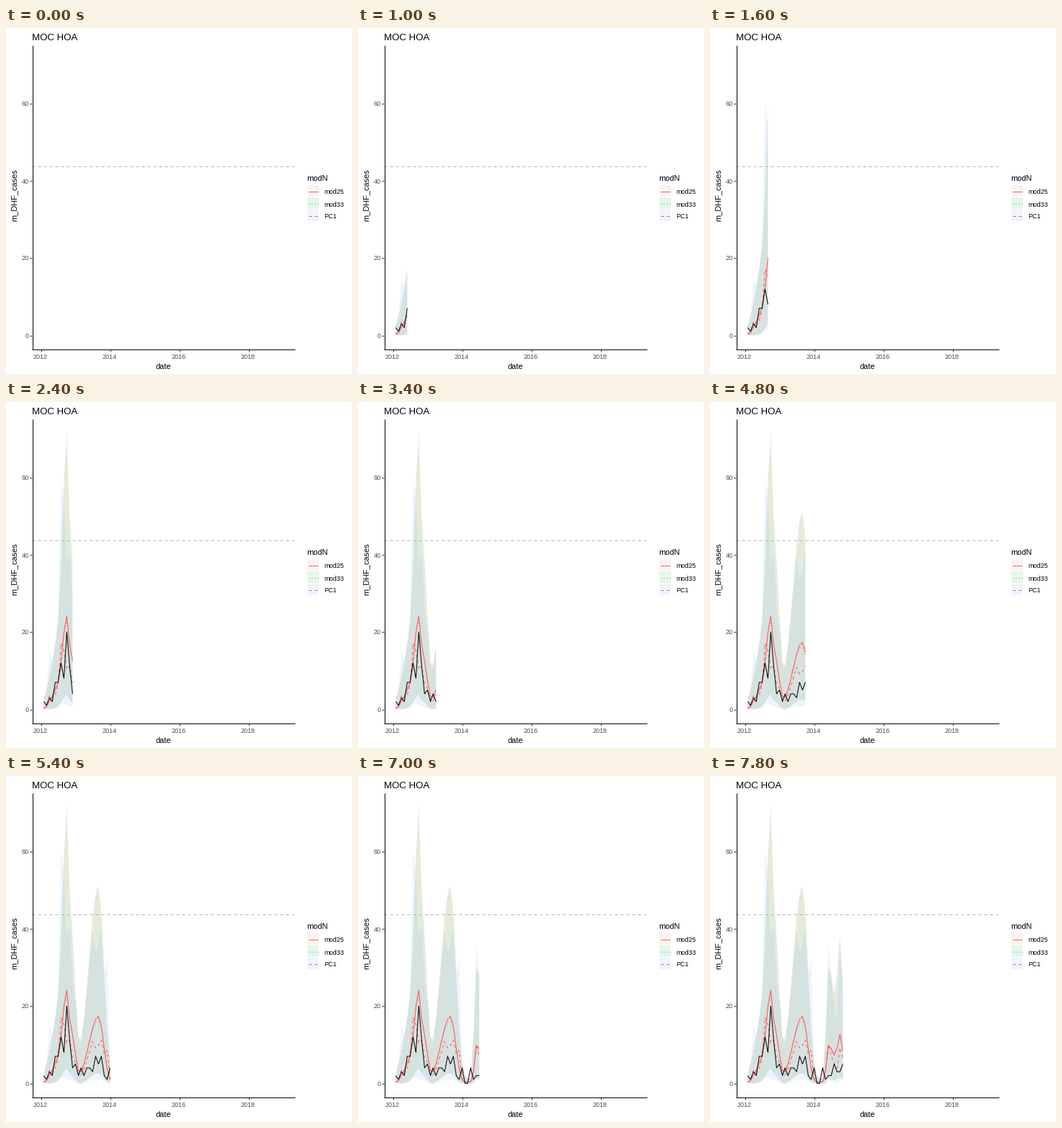
Write a matplotlib script that moves like this. It is 480x480 px and loops after 8 s.

```python
import numpy as np
import matplotlib.pyplot as plt
from matplotlib.animation import FuncAnimation
from matplotlib.patches import Polygon, Rectangle

plt.rcParams["font.family"] = "Liberation Sans"

SIZE, DPI = 480, 80
PX = 72 / DPI                      # points per pixel
FRAMES, INTERVAL = 40, 200
RED, GREEN, BLUE = "#F8766D", "#00BA38", "#619CFF"
LINE = "#FF5A55"
DASHED, DOTTED = (0, (4, 4)), (0, (1, 3))
START = np.datetime64("2012-02")

month = np.arange(34)


def bump(peak, height, rise, fall):
    """Bell curve with its own width on each side of the peak."""
    d = month - peak
    return height * np.exp(-0.5 * (d / np.where(d < 0, rise, fall)) ** 2)


def spikes(pairs, width=0.55):
    return sum(bump(peak, height, width, width) for peak, height in pairs)


# outbreaks: peak month, height, rise, fall
mod_top = (bump(4, 12, 2, 1) + bump(8, 68, 1.7, 0.9) + bump(10, 30, 0.7, 1.1)
           + bump(19, 50, 3.3, 1.8) + bump(28, 29, 0.7, 2.5)
           + bump(32, 29, 0.8, 1.3) + 1)
mod25_top = mod_top + bump(8, 3, 1, 0.7)
mod25 = np.clip(0.36 * mod_top - 1, 0.4, None)
mod33 = 0.95 * mod25
mod_low = np.clip(0.18 * (mod25 - 3), 0, None)

# the third model differs from the others in a few months
pc1_top = 0.93 * mod_top + spikes(
    [(2, 7), (6, 26), (8, -27), (10, -9), (18.5, -19), (22, 19), (28, 9),
     (31, -10)], 0.5)
pc1 = np.clip(0.3 * pc1_top - 1, 0.3, None)
pc1_low = np.clip(0.12 * (pc1 - 3), 0, None)

# cases: growing peaks every second month, then small regular ones
growing = [(m, 2.2 + 0.2 * m ** 2) for m in range(0, 10, 2)]
small = [(m, 4) for m in (11, 13, 15.4, 18, 20, 23, 26, 30.2, 33)]
observed = np.round(np.clip(
    0.07 * mod_top - 0.5 + spikes(growing + small + [(5, 3), (9, 5)]), 0, None))


def px_x(date):
    days = (np.asarray(date, "datetime64[D]") - START.astype("datetime64[D]"))
    return 52.4 + 0.1314 * days.astype(float)


def px_y(value):
    return 426.4 - 5.373 * np.asarray(value, float)


xs = px_x(START + month)
month_frame = np.round(month * 99 / 83)

fig = plt.figure(figsize=(SIZE / DPI, SIZE / DPI), dpi=DPI, facecolor="white")
ax = fig.add_axes([0, 0, 1, 1])
ax.set_xlim(0, SIZE)
ax.set_ylim(SIZE, 0)
ax.axis("off")


def stroke(x, y, color, style="-", z=3):
    return ax.plot(x, y, color=color, ls=style, lw=PX, zorder=z,
                   solid_capstyle="butt", dash_capstyle="butt")[0]


def label(x, y, text, size, color="black", **kw):
    ax.text(x, y, text, fontsize=size * PX, color=color,
            **{"ha": "left", "va": "baseline", **kw})


def draw_axes():
    stroke([36.5, 36.5], [24, 446], "black", z=6)
    stroke([36, 401], [445.5, 445.5], "black", z=6)
    for value in (0, 20, 40, 60):
        y = np.floor(px_y(value)) + 0.5
        stroke([33, 36], [y, y], "#333333")
        label(31.5, y + 4, str(value), 9, "#4D4D4D", ha="right")
    for year in (2012, 2014, 2016, 2018):
        x = np.floor(px_x(f"{year}-01-01")) + 0.5
        stroke([x, x], [446, 449], "#333333")
        label(x - 0.7, 459, str(year), 9, "#4D4D4D", ha="center")
    label(36, 17, "MOC HOA", 13.2)
    label(218.5, 473, "date", 11, ha="center")
    label(16, 232, "m_DHF_cases", 11, rotation=90, ha="right", va="center")
    stroke([36, 401], [191.5, 191.5], "#B4B4B4", DASHED, z=5)


def draw_legend():
    label(417.5, 212, "modN", 11)
    rows = [("mod25", RED, LINE, "-"), ("mod33", GREEN, "#8C8A7C", DOTTED),
            ("PC1", BLUE, LINE, DASHED)]
    for k, (name, fill, color, style) in enumerate(rows):
        y = np.floor(218 + 17.28 * k)
        ax.add_patch(Rectangle((418, y), 16, 16, fc=fill, alpha=0.1, lw=0))
        stroke([420, 433], [y + 8.5, y + 8.5], color, style)
        label(441, y + 12.5, name, 9)


draw_axes()
draw_legend()

bands = []
for low, top, fill in ((mod_low, mod25_top, RED), (mod_low, mod_top, GREEN),
                       (pc1_low, pc1_top, BLUE)):
    patch = Polygon([[0, 0]], closed=True, fc=fill, alpha=0.1, lw=0, zorder=2)
    ax.add_patch(patch)
    bands.append((patch, low, top))

curves = [(stroke([], [], color, style, z), values)
          for values, color, style, z in (
              (mod25, LINE, "-", 3), (mod33, LINE, DOTTED, 3),
              (pc1, LINE, DASHED, 3), (observed, "black", "-", 4))]


def update(frame):
    """Reveal every series up to the month reached in this frame."""
    head = np.interp(frame, month_frame, month)
    t = np.append(month[month < head], head)
    x = np.interp(t, month, xs)
    for patch, low, top in bands:
        y_top = px_y(np.interp(t, month, top))
        y_low = px_y(np.interp(t, month, low))
        patch.set_xy(np.column_stack([np.append(x, x[::-1]),
                                      np.append(y_top, y_low[::-1])]))
        patch.set_visible(frame > 0)
    for curve, values in curves:
        curve.set_data(x, px_y(np.interp(t, month, values)))
        curve.set_visible(frame > 0)
    return [b[0] for b in bands] + [c[0] for c in curves]


anim = FuncAnimation(fig, update, frames=FRAMES, interval=INTERVAL,
                     init_func=lambda: update(0), repeat=True, repeat_delay=0,
                     blit=False)
plt.show()
```
